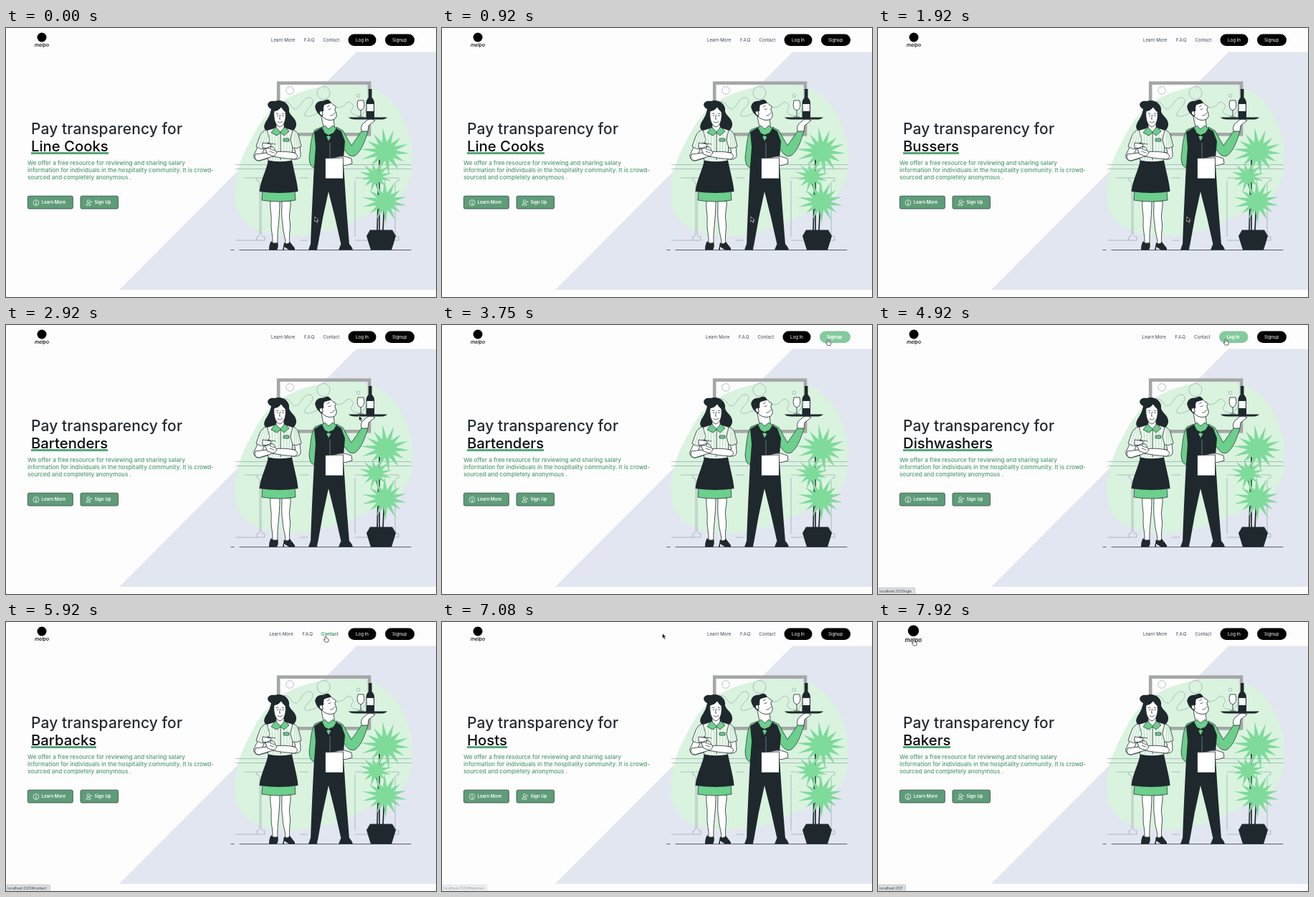
Animation of 600 by 375 pixels, one loop 8 s. Source, as an HTML page:

```html
<!DOCTYPE html>
<html lang="en">
<head>
<meta charset="utf-8">
<title>Pay transparency</title>
<style>
  html, body { margin: 0; width: 100%; height: 100%; overflow: hidden; background: #fdfdfd; }
  body { position: relative; font-family: Inter, Lato, sans-serif; }
  svg { position: absolute; left: 0; top: 0; width: 600px; height: 375px; display: block; }
  .head { font-size: 21px; font-weight: 500; letter-spacing: .1px; fill: #232b33; }
  .copy { font-size: 8.1px; font-weight: 500; fill: #4f9b70; }
  .nav text { font-size: 6.15px; fill: #3b4457; }
  .nav .pill text { fill: #fff; }
  .nav .pill rect { fill: #000; }
  .nav .on text { font-weight: 700; fill: #45966a; }
  .nav .on.pill text { fill: #fff; }
  .nav .on.pill rect { fill: #84ca9d; }
  .button rect { fill: #5f9c79; stroke: #2c4b3b; stroke-width: .8; }
  .button text { font-size: 6.1px; font-weight: 600; fill: #fff; }
  .button path, .button circle { fill: none; stroke: #fff; stroke-width: .7; }
  #word {
    position: absolute; left: 35px; top: 154.5px; height: 18px; line-height: 20px;
    font-size: 20.3px; font-weight: 500; color: #0b0d10; white-space: pre;
    border-bottom: 3px solid #55a777;
  }
  #status {
    position: absolute; left: 0; bottom: 0; height: 9px; line-height: 9.5px; padding: 0 4px 0 2px;
    box-sizing: border-box; font-size: 4.9px; color: #33373b; background: #dcdfe2;
    border: solid #c3c7cb; border-width: .5px .5px 0 0; border-top-right-radius: 2px; white-space: pre;
  }
  .ink { fill: #1f282d; }
  .skin { fill: #fff; stroke: #1f282d; stroke-width: .8; stroke-linejoin: round; }
  .green { fill: #6ccf8b; stroke: #1f282d; stroke-width: .7; stroke-linejoin: round; }
  .shirt { fill: #effaf1; }
  .line { fill: none; stroke: #1f282d; stroke-width: .7; stroke-linecap: round; stroke-linejoin: round; }
  .wall { fill: none; stroke: #8d98a5; stroke-width: .6; }
</style>
</head>
<body>
<svg viewBox="0 0 600 375">
  <path d="M489 33.5H600V365H158Z" fill="#e2e6f0"/>

  <g id="logo">
    <circle cx="50" cy="13" r="6.5"/>
    <text x="50" y="26" text-anchor="middle" font-size="6.8" font-style="italic" font-weight="500">melpo</text>
  </g>

  <g class="nav">
    <g><text x="370" y="19">Learn More</text></g>
    <g><text x="416" y="19" letter-spacing="-.3">F.A.Q</text></g>
    <g><text x="442.5" y="19">Contact</text></g>
    <g class="pill"><rect x="477.5" y="8.5" width="39" height="16.4" rx="8.2"/><text x="488" y="18.8">Log In</text></g>
    <g class="pill"><rect x="529" y="8.5" width="41" height="16.4" rx="8.2"/><text x="539" y="18.8">Signup</text></g>
  </g>

  <text class="head" x="35" y="148.4">Pay transparency for</text>
  <g class="copy">
    <text x="30" y="190.7">We offer a free resource for reviewing and sharing salary</text>
    <text x="30" y="200.9">information for individuals in the hospitality community. It is crowd-</text>
    <text x="30" y="211.1">sourced and completely anonymous .</text>
  </g>
  <g class="button">
    <rect x="30.3" y="234.2" width="63" height="17.8" rx="2"/>
    <circle cx="42" cy="243.5" r="3.9"/><path d="M41.3 242.6H42.2V246M41.2 246H43.2M42 240.7V241.5"/>
    <text x="49.5" y="245.4">Learn More</text>
  </g>
  <g class="button">
    <rect x="104" y="234.2" width="52.5" height="17.8" rx="2"/>
    <circle cx="115" cy="241.6" r="1.9"/><path d="M111.8 247Q112 244.4 115 244.4T118.2 247ZM117.5 243.5L120 241.5M118.7 241.4L120.2 243"/>
    <text x="123.5" y="245.4">Sign Up</text>
  </g>

  <!-- room -->
  <path d="M319.500 238C318 207 328 181 340 159C351 139 360 119 384 103C408 87 440 80 470 79C515 77 542 97 556 130C566 153 569 175 566 200C562 235 535 247 510 258C480 272 455 284 420 289C375 294 322 285 319.500 238Z" fill="#d9f3df"/>
  <path class="wall" d="M320 190.500H566M320 196.500H566M333 209H361V213Q356 213 356 218V286Q356 291 361 291V296H320M350 209V213Q354 213 354 218V286Q354 291 350 291V296M410 209H422M410 296H421M487 209H548V213Q543 213 543 218V286Q543 291 548 291V296H487M487 213V291"/>
  <path class="line" d="M326 309.500H565M314 309.500H318"/>
  <rect x="380.200" y="76.700" width="126.800" height="71.600" fill="none" stroke="#a4a7a6" stroke-width="4.600"/>
  <g class="wall">
    <circle cx="396" cy="87" r="5.300"/><circle cx="443" cy="90.500" r="9"/><circle cx="491.500" cy="94.500" r="2.300"/>
    <path d="M386 103Q394 101 399 110T414 103C423 90 434 100 424 110S414 126 427 122S445 105 459 110S474 98 482 105S474 116 486 121S499 118 504 110"/>
  </g>

  <!-- plant -->
  <path d="M521 283V172M518 283L520 208M526 283L528 240M519 225L513 205" stroke="#1f282d" stroke-width="1.700" fill="none"/>
  <g id="leaves" fill="#7edb9a"></g>
  <path class="ink" d="M508 281.500H539L544 290L538 309.500H509L503 290Z"/>

  <!-- waitress -->
  <path class="ink" d="M370 113C361 108 366 100 375 102C385 98 397 106 395 116C396 122 404 125 405 133C406 142 397 147 390 141H370C364 146 358 141 361 134C363 128 368 125 370 113Z"/>
  <path class="skin" d="M377 133V141Q383 149 388 141V132Z"/>
  <path class="skin" d="M374 116Q381 115 384 110Q387 115 390 117C391 126 389 136 382 138C376 136 373 127 374 116Z"/>
  <path class="line" d="M377 119.500L380 119M385 119L388 119.500M382.500 121L381.500 127H383M379 131Q382.500 133.500 386 130.500"/>
  <circle class="ink" cx="379" cy="122.300" r=".8"/><circle class="ink" cx="386.500" cy="122.300" r=".8"/>
  <path class="skin" d="M369 240C368 254 371 261 370 270C369 281 373 290 372 300H379C378 284 382 268 382 241ZM385 241C385 254 384 263 386 272C386 284 390 291 390 301H396C394 288 398 280 396 269C394 260 398 250 397 241Z"/>
  <path class="ink" d="M370 297Q373 302 379 299Q381 304 378 309.500H367Q367 302 370 297ZM388 299Q392 303 396 298L403 307V309.500H395L388 305V309.500H386Z"/>
  <path class="green" d="M358 227L357 240Q381 244 404 240L403 227Z"/>
  <path class="skin" d="M352 164L345.500 178Q347 186 354 185L375 179V173L357 176L362 165ZM402 165L404 174L387 172L374 177Q380 182 403 183Q412 183 411 176L410 164Z"/>
  <path class="skin shirt" d="M376 139L363 143L366 187H398L402 143L389 139L383 147Z"/>
  <path class="skin shirt" d="M364 142Q357 143 354 151L349 165Q355 170 363 168L368 156ZM400 142Q408 144 409 153L412 165Q406 169 400 167L397 156Z"/>
  <path id="stripes" fill="none" stroke="#8bc99c" stroke-width=".6"/>
  <path class="green" d="M376 138L370 146L378 150L383 146L388 150L395 144L389 138L383 145Z"/>
  <path class="line" d="M383 147V184"/>
  <rect class="green" x="387" y="154" width="8" height="4" rx="1"/>
  <path class="skin" d="M348 176L372 173Q389 171 402 174Q411 178 403 183Q386 182 372 179L353 185Q345 184 348 176Z"/>
  <path class="skin" d="M358 160L370 162L369 168L358 167ZM362 169Q367 164 373 166L378 174L374 179L365 176Z"/>
  <path class="line" d="M364 160L376 162M369 169L375 171M368 172L374 174"/>
  <path class="ink" d="M366 184.500Q382 188 399 184.500C402 200 407 217 407.500 228Q382 232 353.500 228C355 213 363 199 366 184.500Z"/>

  <!-- waiter -->
  <path class="skin" d="M439 118L444 143H459L457 126Z"/>
  <g transform="rotate(-10 448 125)">
    <path class="skin" d="M440 106C448 100 456 102 459 108L463 112L460.500 116Q464 125 458 129C450 131 442 126 440 118Z"/>
    <path class="ink" d="M434 107Q437 99 447 101Q456 98 457 106Q451 106 447 107Q445 111 445 115L443 115L442 123Q434 117 434 107Z"/>
    <path class="skin" d="M443 115Q438 113 439 118Q440 122 443 120Z"/>
    <path class="line" d="M451 110L454 109M452 114Q454 115 455.500 113.500M453 123Q457 124 460 120"/>
  </g>
  <path class="green" d="M441 138L431 142C425 151 425 168 423 180Q423 194 431 195L453 191L452 180L437 180L444 158ZM461 138L470 143L482 164L496 144Q501 140 505 144C501 158 495 173 487 178Q480 181 474 172L460 154Z"/>
  <path class="skin" d="M496 144Q494 135 501 131Q507 124 515 129L506 136L505 144Z"/>
  <path class="ink" d="M440 139L450 151L460 139L468 144L473 158L470 193H430L432 166L430 145Z"/>
  <path class="green" d="M441 139L450 158L461 140L456 136L450 141L445 136Z"/>
  <path class="ink" d="M450 149L444 146V153L450 150L457 154V146Z"/>
  <path class="line" d="M452 160V190" style="stroke:#8d9b99"/>
  <path class="ink" d="M430 191H471C473 218 474 238 476 264L479 302L468 304L459 264L450 228L442 265L435 304H425C426 270 428 230 430 191Z"/>
  <path class="ink" d="M425 301L435 302L434 309.500H422ZM467 302L478 300Q483 305 484 309.500H464Z"/>
  <path class="skin" d="M452 182L466 179Q473 178 482 182L483 189Q474 193 465 191L452 191Z"/>
  <path class="skin" d="M445.500 181.500L470.500 181V210H445.500Z"/>

  <!-- tray -->
  <path class="ink" d="M478 124.500H532Q530 127.600 522 127.600H488Q480 127.500 478 124.500Z"/>
  <path class="ink" d="M506 85H510.500V97Q514 100 514 105V125H502.500V105Q502.500 100 506 97Z"/>
  <rect x="503.500" y="106" width="9.500" height="10" fill="#f5f7f8"/>
  <path class="skin" d="M491 101H499Q502 113 495 115Q488 113 491 101ZM495 115V123.500M491 124H499"/>

  <g id="pointer" stroke-linejoin="round">
    <path id="arrow" d="M0 0V7L1.700 5.500L2.900 8.300L4.200 7.700L3 5H5.200Z" fill="#000" stroke="#fff" stroke-width=".6"/>
    <path id="hand" d="M-1 .5Q0-.7 1 .5V2.700Q3.800 2.700 4.200 4V6L3.300 8H-.5L-2.700 5Q-2.800 3.500-1 4.600Z" fill="#fff" stroke="#222" stroke-width=".7"/>
  </g>
</svg>
<span id="word"></span>
<div id="status"></div>

<script>
  const LOOP = 8000;
  const byId = id => document.getElementById(id);
  const items = [...document.querySelectorAll(".nav > g")];
  const [logo, pointer, arrow, hand, word, status] =
    ["logo", "pointer", "arrow", "hand", "word", "status"].map(byId);

  const words = [
    [0, "Line Cooks"], [960, "Bussers"], [2840, "Bartenders"], [4330, "Dishwashers"],
    [5420, "Barbacks"], [6500, "Hosts"], [7500, "Bakers"]
  ];
  const LOGO = 5;
  const STATUS_DELAY = 240;
  const hovers = [
    { from: 3560, to: 4380, item: 4, link: "/signup" },
    { from: 4480, to: 5180, item: 3, link: "/login" },
    { from: 5240, to: 6060, item: 2, link: "/#contact" },
    { from: 6100, to: 6260, item: 1, link: "/#faq" },
    { from: 6320, to: 6720, item: 0, link: "/#features" },
    { from: 7640, to: LOOP, item: LOGO, link: "" }
  ];
  const boldGain = [2.5, 1, 2.5, 1.5, 2];
  const path = [
    [0, 431, 263], [2420, 431, 263], [3330, 538, 26], [3600, 538.5, 20.5], [4200, 538.5, 20.5],
    [4700, 485, 20], [5000, 485, 20], [5400, 446, 20], [5980, 446, 20], [6400, 392, 18],
    [6620, 384, 17], [7080, 307.5, 16], [7720, 50, 25], [LOOP, 50, 25]
  ];

  const latest = (list, t, start) => list.filter(entry => start(entry) <= t).pop();
  const clamp = v => Math.max(0, Math.min(1, v));

  function pointerAt(t) {
    const i = path.findIndex(key => key[0] > t);
    const [t0, x0, y0] = path[i - 1], [t1, x1, y1] = path[i];
    const p = (t - t0) / (t1 - t0), e = p * p * (3 - 2 * p);
    return [x0 + (x1 - x0) * e, y0 + (y1 - y0) * e];
  }

  function star(cx, cy, radius, spikes, turn) {
    const points = Array.from({ length: spikes * 2 }, (_, i) => {
      const a = turn + i * Math.PI / spikes;
      const r = i % 2 ? radius * .38 : radius * (.9 + .1 * Math.sin(i * 2.3));
      return `${cx + r * Math.cos(a)},${cy + r * .92 * Math.sin(a)}`;
    });
    return `<polygon points="${points.join(" ")}"/>`;
  }

  byId("leaves").innerHTML =
    star(530, 172, 37, 14, .1) + star(516, 207, 25, 12, .3) + star(529, 242, 34, 14, .2);

  byId("stripes").setAttribute("d",
    Array.from({ length: 8 }, (_, i) => `M${367 + i * 4.2} 148L${368.5 + i * 3.8} 184`).join("") +
    Array.from({ length: 3 }, (_, i) => `M${360 + i * 3} 145L${353 + i * 4} 166M${402 + i * 2} 145L${403 + i * 3} 166`).join(""));

  function showNav(active) {
    items.forEach((group, i) => {
      const shift = active >= i && active < LOGO ? boldGain[active] : 0;
      group.setAttribute("transform", `translate(${-shift} 0)`);
      group.classList.toggle("on", active === i);
      const pill = group.querySelector("rect");
      if (pill) pill.setAttribute("width", [39, 41][i - 3] + (active === i ? shift : 0));
    });
    logo.setAttribute("transform", active === LOGO ? "translate(50 17) scale(1.18) translate(-50.5 -17)" : "");
  }

  function showStatus(t) {
    const last = latest(hovers, t - STATUS_DELAY, h => h.from);
    status.textContent = last ? "localhost:2121" + last.link : "";
    status.style.opacity = last ? clamp(1 - (t - last.to - STATUS_DELAY) / 240) : 0;
  }

  function render(t) {
    word.textContent = latest(words, t, w => w[0])[1];

    const last = latest(hovers, t, h => h.from);
    const active = last && t < last.to ? last.item : -1;
    showNav(active);
    showStatus(t);

    pointer.setAttribute("transform", `translate(${pointerAt(t)})`);
    arrow.style.display = active < 0 ? "" : "none";
    hand.style.display = active < 0 ? "none" : "";
  }

  const start = performance.now();
  function frame() {
    render((performance.now() - start) % LOOP);
    requestAnimationFrame(frame);
  }
  frame();
</script>
</body>
</html>
```
